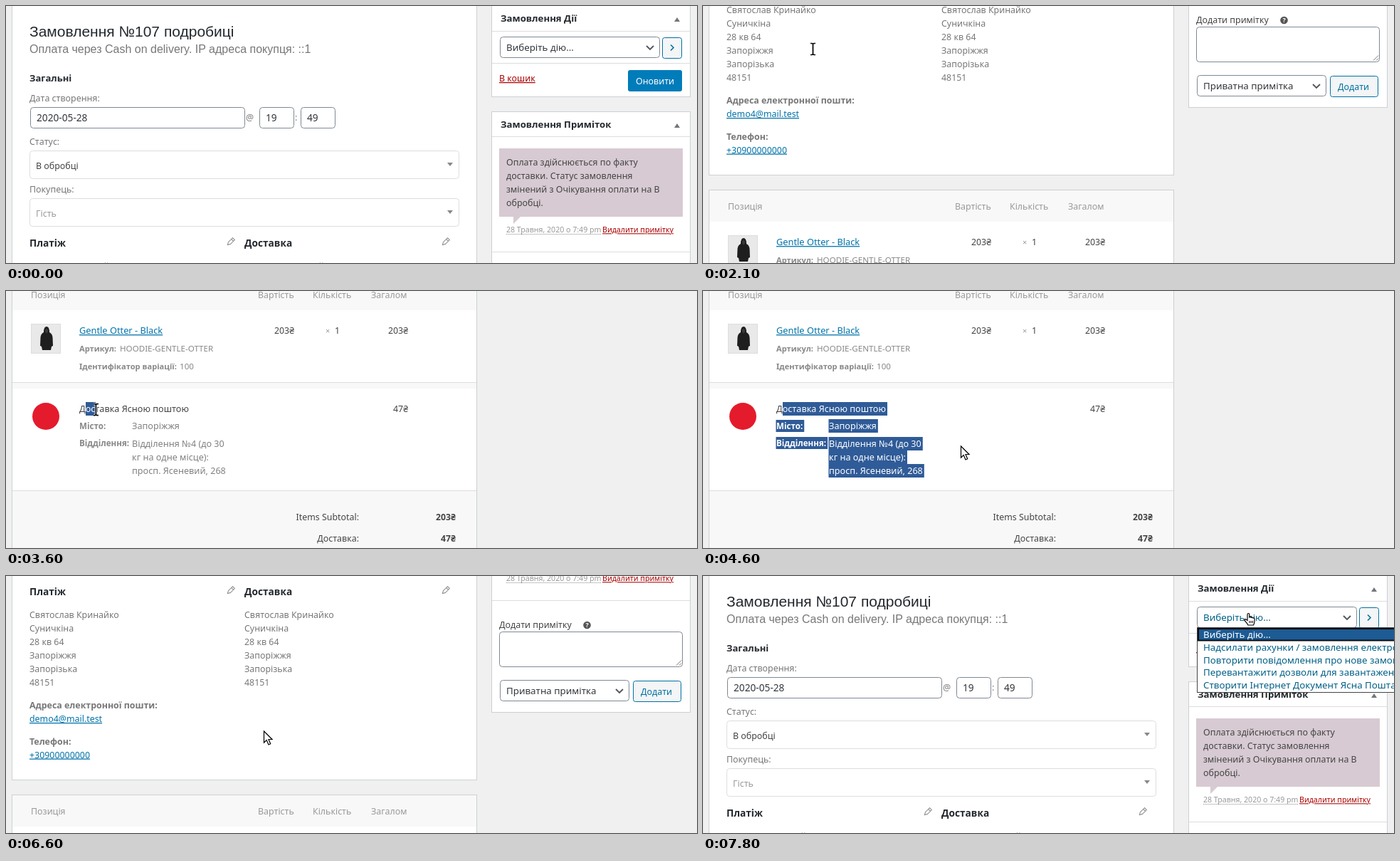
Recreate the animation shown at these times as an HTML page. Size 971 by 361 pixels, loop 8 s.

```html
<!DOCTYPE html>
<html lang="uk">
<head>
<meta charset="utf-8">
<title>Замовлення</title>
<style>
html, body { margin: 0; width: 100%; height: 100%; overflow: hidden; background: #f0f0f0; }
svg { display: block; width: 971px; height: 361px; }
text { font-family: "Noto Sans", "Open Sans", sans-serif; white-space: pre; }
.head { font-family: "Liberation Sans", Arial, sans-serif; }
</style>
</head>
<body>
<svg id="stage" viewBox="0 0 971 361" xmlns="http://www.w3.org/2000/svg"></svg>
<script>
const LOOP = 8000;
const GREY = '#777', DARK = '#444', BLUE = '#0073aa', INK = '#23282d', RED = '#a00', SELECT = '#2f5b98';
const BODY = 12.4, FIELD = 13.3;

// y is the middle of the capitals
function text(x, y, str, o = {}) {
  const size = o.size || BODY;
  return `<text x="${x}" y="${(y + size * 0.36).toFixed(1)}" font-size="${size}" fill="${o.fill || GREY}"` +
    (o.bold ? ' font-weight="700"' : '') +
    (o.end ? ' text-anchor="end"' : '') +
    (o.under ? ' text-decoration="underline"' : '') +
    (o.cls ? ` class="${o.cls}"` : '') +
    (o.id ? ` id="${o.id}"` : '') + `>${str}</text>`;
}
const lines = (x, y, list, o) => list.map((s, i) => text(x, y + i * 19, s, o)).join('');
const box = (x, y, w, h, fill, stroke = 'none', r = 0) =>
  `<rect x="${x}" y="${y}" width="${w}" height="${h}" rx="${r}" fill="${fill}" stroke="${stroke}"/>`;
const panel = (x, y, w, h) => box(x + 0.5, y + 0.5, w, h, '#fff', '#ccd0d4');
const field = (x, y, w, h = 29) => box(x + 0.5, y + 0.5, w, h, '#fff', '#7e8993', 4);
const rule = (x1, x2, y, c = '#ddd') => `<path d="M${x1} ${y}.5H${x2}" stroke="${c}"/>`;
const chevron = (x, y) =>
  `<path d="M${x - 5} ${y - 2.5}l5 5 5-5" fill="none" stroke="#50555a" stroke-width="1.8"/>`;
const toggle = y => `<path d="M939 ${y + 3}h8l-4-6z" fill="#72777c"/>`;
const pencil = x => `<g transform="translate(${x} 331) rotate(45)" fill="none" stroke="#858585">
  <path d="M-2-5.5h4V3L0 6.5-2 3zM-2-3h4"/></g>`;
const button = (x, y, w) => box(x + 0.5, y + 0.5, w, 29, '#f3f5f6', '#0071a1', 3);

function combo(y, str, fill) {
  return box(33.5, y + 0.5, 603, 39, '#fff', '#ddd', 4) + text(42, y + 21, str, { fill }) +
    `<path d="M620 ${y + 17}h8l-4 5z" fill="#888"/>`;
}

const address = ['Святослав Кринайко', 'Суничкіна', '28 кв 64', 'Запоріжжя', 'Запорізька', '48151'];

function orderPanel() {
  return panel(8, -20, 653, 617) +
    text(33, 35.5, 'Замовлення №107 подробиці', { size: 21, fill: INK, cls: 'head' }) +
    text(33, 60.5, 'Оплата через Cash on delivery. IP адреса покупця: ::1', { size: 16, cls: 'head' }) +
    text(33, 101, 'Загальні', { size: 13, fill: INK, bold: 1 }) +
    text(33, 129.5, 'Дата створення:') +
    field(34, 142, 301) + field(356, 142, 48) + field(414, 142, 48) +
    text(43, 157, '2020-05-28', { size: 13.7, fill: '#32373c' }) +
    text(337, 156, '@') + text(406, 156, ':') +
    text(365, 157, '19', { size: 13.7, fill: '#32373c' }) +
    text(423, 157, '49', { size: 13.7, fill: '#32373c' }) +
    text(33, 190, 'Статус:') + combo(203, 'В обробці', DARK) +
    text(33, 257, 'Покупець:') + combo(270, 'Гість', '#999') +
    [[33, 'Платіж'], [335, 'Доставка']].map(([x, s]) =>
      text(x, 333, s, { size: 13.7, fill: INK, bold: 1 }) + pencil(x + 283) +
      lines(x, 365.5, address)).join('') +
    text(33, 492.5, 'Адреса електронної пошти:', { size: 12.4, bold: 1 }) +
    text(33, 511.5, 'demo4@mail.test', { fill: BLUE, under: 1 }) +
    text(33, 543, 'Телефон:', { size: 12.4, bold: 1 }) +
    text(33, 562, '+30900000000', { fill: BLUE, under: 1 });
}

function sidePanels() {
  return panel(682, -20, 279, 147) +
    text(695, 17, 'Замовлення Дії', { size: 13.2, fill: INK, bold: 1 }) + toggle(19) +
    rule(683, 961, 35) + field(694, 43, 224) +
    text(703, 58, 'Виберіть дію...', { size: FIELD, fill: '#32373c', id: 'action' }) + chevron(905, 58.5) +
    button(922, 44, 27) +
    '<path d="M934 54.5l4 4-4 4" fill="none" stroke="#0071a1" stroke-width="1.6"/>' +
    rule(683, 961, 80) + text(693, 101.5, 'В кошик', { fill: RED, under: 1 }) +
    box(874, 90, 76, 30, '#007cba', 'none', 3) + text(885, 105, 'Оновити', { fill: '#fff' }) +
    panel(682, 148, 279, 354) +
    text(695, 166, 'Замовлення Приміток', { size: 13.2, fill: INK, bold: 1 }) + toggle(168) +
    rule(683, 961, 183) +
    '<path d="M693 200H951V296H723L713 306V296H693z" fill="#d7cad2"/>' +
    lines(703, 219.5, ['Оплата здійснюється по факту', 'доставки. Статус замовлення',
      'змінений з Очікування оплати на В', 'обробці.'], { fill: DARK }) +
    text(703, 314.5, '28 Травня, 2020 о 7:49 pm', { size: 10.6, fill: '#999' }) +
    '<path d="M703 320.5H836" stroke="#888" stroke-dasharray="1 1"/>' +
    text(838, 314.5, 'Видалити примітку', { size: 10.6, fill: RED, under: 1 }) +
    rule(683, 961, 345) + text(693, 379.5, 'Додати примітку', { fill: DARK }) +
    '<circle cx="816.5" cy="380" r="5.3" fill="#555"/>' +
    text(814.4, 380, '?', { size: 9, fill: '#fff', bold: 1 }) +
    field(693, 389, 257, 49) +
    '<path d="M942 436.5l7-7M946 436.5l3-3" stroke="#777"/>' +
    field(694, 457, 181) + text(703, 472, 'Приватна примітка', { size: FIELD, fill: '#32373c' }) +
    chevron(862, 472.5) + button(881, 458, 67) + text(892, 473, 'Додати', { fill: '#0071a1' });
}

function itemsPanel() {
  const head = { fill: '#999' }, cell = { fill: DARK, end: 1 };
  const sub = { size: 11.6, fill: '#888' }, key = { size: 11.1, fill: '#888', bold: 1 };
  const total = { size: 12.2, fill: DARK, bold: 1, end: 1 };
  return panel(8, 618, 653, 520) +
    box(9, 619, 652, 44, '#f8f8f8') +
    [[35, 'Позиція'], [354, 'Вартість'], [431, 'Кількість'], [513, 'Загалом']]
      .map(([x, s]) => text(x, 641, s, head)).join('') +
    box(35.5, 682.5, 41, 41, '#e9e9e9', '#ddd') +
    '<path d="M53 694q0-8 4-8t4 8q4 2 4.5 7l.5 12-2 1-1 5H51l-1-5-2-1 .5-12q.5-5 4.5-7z" fill="#1e1e1e"/>' +
    '<path d="M55 693q0-4 2-4t2 4l-2 3z" fill="#3a3a3a"/>' +
    text(103, 691.5, 'Gentle Otter - Black', { size: 12.8, fill: BLUE, under: 1 }) +
    text(103, 716.5, 'Артикул:', key) + text(160, 716.5, 'HOODIE-GENTLE-OTTER', sub) +
    text(103, 741.5, 'Ідентифікатор варіації:', key) + text(244, 741.5, '100', sub) +
    text(405, 691.5, '203₴', cell) + text(565, 691.5, '203₴', cell) +
    text(449, 691.5, '×', { size: 11, fill: '#999' }) + text(462, 691.5, '1', { fill: DARK }) +
    box(9, 764, 652, 9, '#f8f8f8') + rule(9, 661, 764) +
    '<circle cx="56" cy="812" r="19" fill="#e41b2c"/>' +
    text(565, 801.5, '47₴', cell) +
    box(9, 916, 652, 222, '#f8f8f8') + rule(9, 661, 916) +
    text(496, 953.5, 'Items Subtotal:', cell) + text(632, 953.5, '203₴', total) +
    text(496, 983.5, 'Доставка:', cell) + text(632, 983.5, '47₴', total);
}

// Selectable lines: x, middle, half height, text, style, indent of the selection
const KEY = { size: 11.6, fill: '#888', bold: 1 }, VAL = { size: 12.6, fill: '#808080' };
const picks = [
  [103, 801.5, 9.5, 'Доставка Ясною поштою', { size: 12.6, fill: DARK }, 9],
  [103, 825.5, 8.5, 'Місто:', KEY, 0],
  [177, 825.5, 9.5, 'Запоріжжя', VAL, 0],
  [103, 849.5, 8.5, 'Відділення:', KEY, 0],
  [177, 850.5, 9.5, 'Відділення №4 (до 30', VAL, 0],
  [177, 869.5, 9.5, 'кг на одне місце):', VAL, 0],
  [177, 888.5, 9.5, 'просп. Ясеневий, 268', VAL, 0]
];
const pickText = white => picks.map(([x, y, , s, o], i) =>
  text(x, y, s, white ? { ...o, fill: '#fff' } : { ...o, id: 'pick' + i })).join('');
const marks = cls => picks.map(() => `<rect class="${cls}" fill="${SELECT}"/>`).join('');

function menu() {
  const options = ['Надсилати рахунки / замовлення електронною поштою',
    'Повторити повідомлення про нове замовлення', 'Перевантажити дозволи для завантаження',
    'Створити Інтернет Документ Ясна Пошта'];
  return `<g id="menu">${box(694.5, 72.5, 290, 91, '#fff', '#444')}` +
    `<rect x="696" y="74" width="290" height="16.5" fill="#1d5b94" stroke="#0b0b0b" stroke-width="2"/>` +
    text(703, 82, 'Виберіть дію...', { size: FIELD, fill: '#fff' }) +
    options.map((s, i) => text(703, 100 + i * 17.7, s, { size: FIELD, fill: '#016087' })).join('') + '</g>';
}

const beam = 'M-3.5-8H-1.5Q0-8 0-6.5V6.5Q0 8-1.5 8H-3.5M3.5-8H1.5Q0-8 0-6.5M0 6.5Q0 8 1.5 8H3.5';
const cursors = `<g id="cursor">
  <g id="beam" fill="none"><path d="${beam}" stroke="#fff" stroke-width="3.4"/>
    <path d="${beam}" stroke="#000" stroke-width="1.7"/></g>
  <path id="arrow" d="M.5.5V16.5L4.2 13 7 19.5 9.7 18.3 7 12H12z" fill="#fff" stroke="#000" stroke-width="1.2"/>
  <g id="hand"><path d="M0 2Q0 .5 1.4.5T2.8 2V6Q4.5 5 5.3 6.4 7 5.6 7.8 7 9.8 6.4 10 8.4V12Q10 14 8.6 17H1Q0 14.5-4 10.5-4.6 8.6-2.6 8.6L0 10.4z"
    fill="#fff" stroke="#000" stroke-width="1.2"/><path d="M3 11v3M5.2 11v3M7.4 11v3" stroke="#000"/></g></g>`;

const $ = id => document.getElementById(id);
$('stage').innerHTML = `<defs><clipPath id="picked">${marks('cut')}</clipPath></defs>
  <rect width="971" height="361" fill="#f0f0f0"/>
  <g id="page">${orderPanel()}${sidePanels()}${itemsPanel()}${pickText(false)}${marks('mark')}
  <g clip-path="url(#picked)">${pickText(true)}</g></g>${menu()}${cursors}`;

const cuts = document.querySelectorAll('.cut'), shades = document.querySelectorAll('.mark');

// time, scroll offset
const scrollKeys = [[1500, 0], [1600, 18], [1700, 63], [1800, 106], [1900, 106], [2000, 190], [2200, 530],
  [2400, 530], [2500, 570], [2600, 612], [2700, 633], [2800, 636], [6100, 636], [6200, 635], [6300, 600],
  [6400, 520], [6600, 311], [6800, 50], [6900, 50], [7000, 0]];
// first step, last step, x, y, shape
const moves = [[1400, 1400, 141.5, 31.5, 'beam'], [1600, 1600, 154.5, 60.5, 'beam'],
  [2800, 3300, 113, 161, 'beam'], [3400, 3400, 115.5, 161, 'beam'], [3600, 4200, 311.5, 262, 'beam'],
  [4600, 4600, 362, 217.5, 'arrow'], [7300, 7500, 710, 80, 'arrow'], [7700, 7700, 765, 52, 'hand']];

function scrollAt(t) {
  let [t0, v0] = scrollKeys[0];
  for (const [t1, v1] of scrollKeys) {
    if (t < t1) return Math.round(v0 + (v1 - v0) * Math.max(0, t - t0) / (t1 - t0));
    [t0, v0] = [t1, v1];
  }
  return v0;
}

function cursorAt(t) {
  let c = null;
  for (const [a, b, x, y, kind] of moves) {
    if (t < a) break;
    const k = Math.min(1, (t - a + 100) / (b - a + 100)), e = k * k * (3 - 2 * k);
    c = c ? { x: c.x + (x - c.x) * e, y: c.y + (y - c.y) * e, kind } : { x, y, kind };
  }
  return c;
}

function select(t) {
  const on = t >= 3600 && t < 5500;
  const c = on && cursorAt(Math.min(t, 4200));
  picks.forEach(([x, y, h, , , indent], i) => {
    let w = 0;
    const left = x + (indent || -0.5);
    if (on && c.y + 636 > y - h) {
      let right = x + $('pick' + i).getComputedTextLength() + 2;
      if (c.y + 636 <= y + h) right = Math.min(right, c.x);
      w = Math.max(0, right - left);
    }
    for (const r of [cuts[i], shades[i]]) {
      r.setAttribute('x', left);
      r.setAttribute('y', y - h);
      r.setAttribute('width', w);
      r.setAttribute('height', 2 * h);
    }
  });
}

function draw(ms) {
  const t = Math.floor(ms % LOOP / 100) * 100;
  const c = cursorAt(t);
  $('page').setAttribute('transform', `translate(0 ${-scrollAt(t)})`);
  $('cursor').style.display = c ? '' : 'none';
  if (c) {
    $('cursor').setAttribute('transform', `translate(${c.x.toFixed(1)} ${c.y.toFixed(1)})`);
    for (const k of ['beam', 'arrow', 'hand']) $(k).style.display = k === c.kind ? '' : 'none';
  }
  select(t);
  $('action').setAttribute('fill', t >= 7700 ? '#016087' : '#32373c');
  $('menu').style.display = t >= 7800 ? '' : 'none';
}

let start;
function tick(now) {
  if (start === undefined) start = now;
  draw(now - start);
  requestAnimationFrame(tick);
}
draw(0);
requestAnimationFrame(tick);
</script>
</body>
</html>
```
